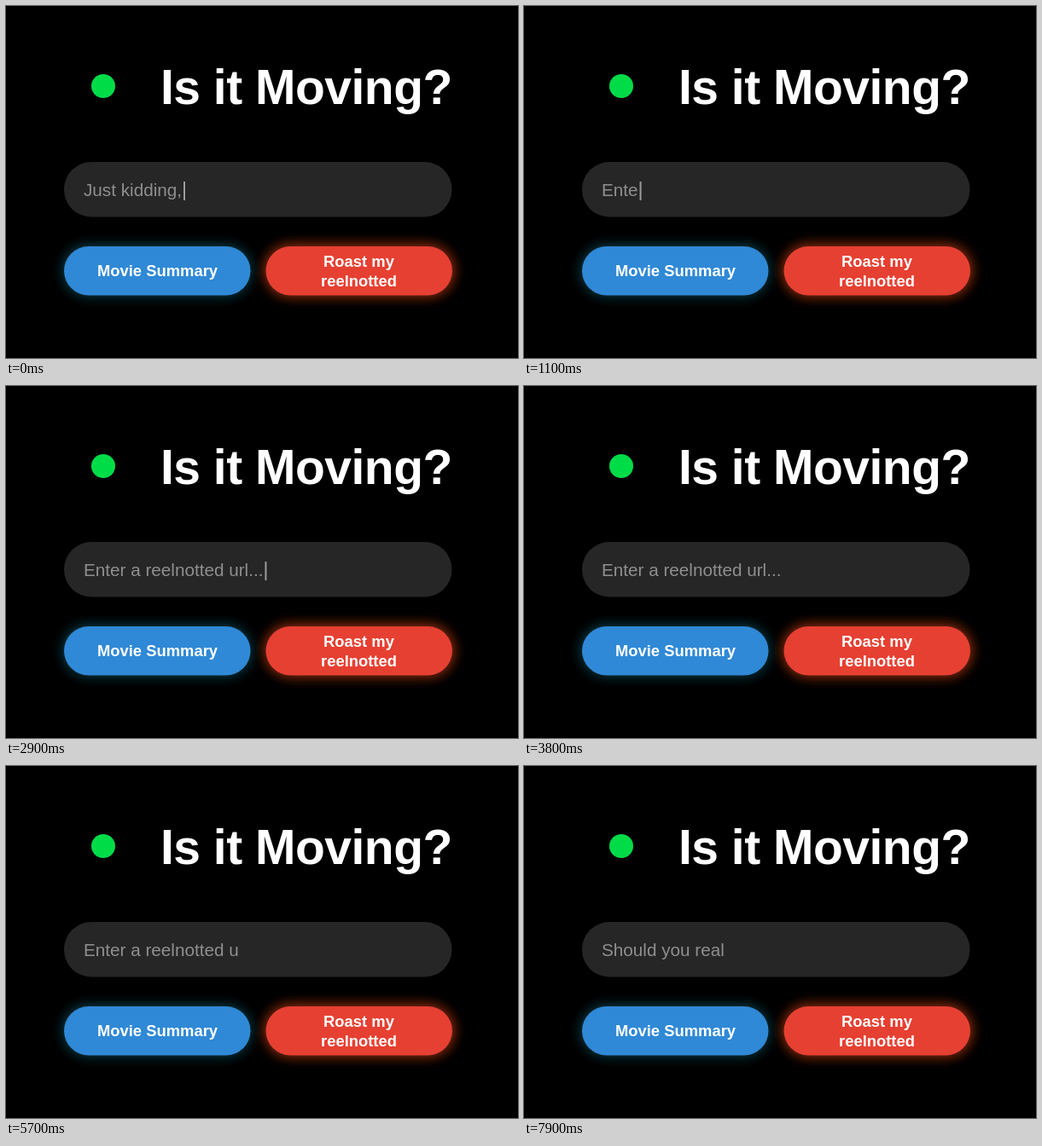
These frames come from a looping animation (600x413 px, 8000 ms). An HTML page:

```html
<!DOCTYPE html>
<html lang="en">
<head>
<meta charset="utf-8">
<title>Is it Moving?</title>
<style>
  html, body { margin: 0; width: 100%; height: 100%; overflow: hidden; background: #000; }
  svg { display: block; width: 100vw; height: 100vh; }
  text { font-family: "Liberation Sans", Arial, sans-serif; white-space: pre; }
  .title { font-size: 57px; font-weight: 700; letter-spacing: -.5px; fill: #fff; }
  .label { font-size: 18.4px; font-weight: 700; fill: #fff; text-anchor: middle; }
  #typed { font-size: 20.7px; fill: #8f8f8f; }
</style>
</head>
<body>
<svg viewBox="0 0 600 413">
  <defs>
    <filter id="glow" x="-20%" y="-60%" width="140%" height="220%">
      <feGaussianBlur stdDeviation="7"/>
    </filter>
  </defs>
  <rect width="600" height="413"/>

  <circle cx="114" cy="94" r="14" fill="#00dc48"/>
  <text class="title" x="181" y="115">Is it Moving?</text>

  <rect x="68" y="183" width="454.5" height="64.5" rx="32" fill="#262626"/>
  <text id="typed" x="91" y="223"></text>
  <rect id="cursor" y="206" width="2" height="22" fill="#9c9c9c"/>

  <rect x="66" y="280" width="222" height="61" rx="30.5" fill="#0c3c48" filter="url(#glow)"/>
  <rect x="68" y="282" width="218.5" height="57.5" rx="28.75" fill="#2f89d6"/>
  <text class="label" x="177.5" y="317">Movie Summary</text>

  <rect x="302" y="279" width="224" height="63" rx="31.5" fill="#8c2a10" filter="url(#glow)"/>
  <rect x="304.5" y="282" width="218.5" height="57.5" rx="28.75" fill="#e64032"/>
  <text class="label" x="413.5" y="306">Roast my</text>
  <text class="label" x="413.5" y="328.5">reelnotted</text>
</svg>
<script>
  const LOOP = 8000, STEP = 100, KEY_MS = 61;
  const BLINK = { period: 1095, offset: 530 };
  const typed = document.getElementById("typed");
  const cursor = document.getElementById("cursor");

  const phrases = [
    { text: "Just kidding,", start: -5000, erase: 0 },
    { text: "Enter a reelnotted url...", start: 840, erase: 5370 },
    { text: "Should you really", start: 6950, erase: Infinity }
  ];

  const keysSince = (t, from) => Math.floor((t - from) / KEY_MS);

  function textAt(t) {
    const { text, start, erase } = phrases.findLast(p => t >= p.start);
    const count = t < erase ? keysSince(t, start) : text.length - keysSince(t, erase);
    return text.slice(0, Math.max(0, count));
  }

  function render(time) {
    const t = Math.floor((time % LOOP) / STEP) * STEP;
    const lit = (t + BLINK.offset) % BLINK.period < BLINK.period / 2;
    typed.textContent = textAt(t);
    cursor.setAttribute("x", 93 + typed.getComputedTextLength());
    cursor.style.visibility = lit ? "visible" : "hidden";
  }

  const began = performance.now();
  function tick() {
    render(performance.now() - began);
    requestAnimationFrame(tick);
  }
  tick();
</script>
</body>
</html>
```
